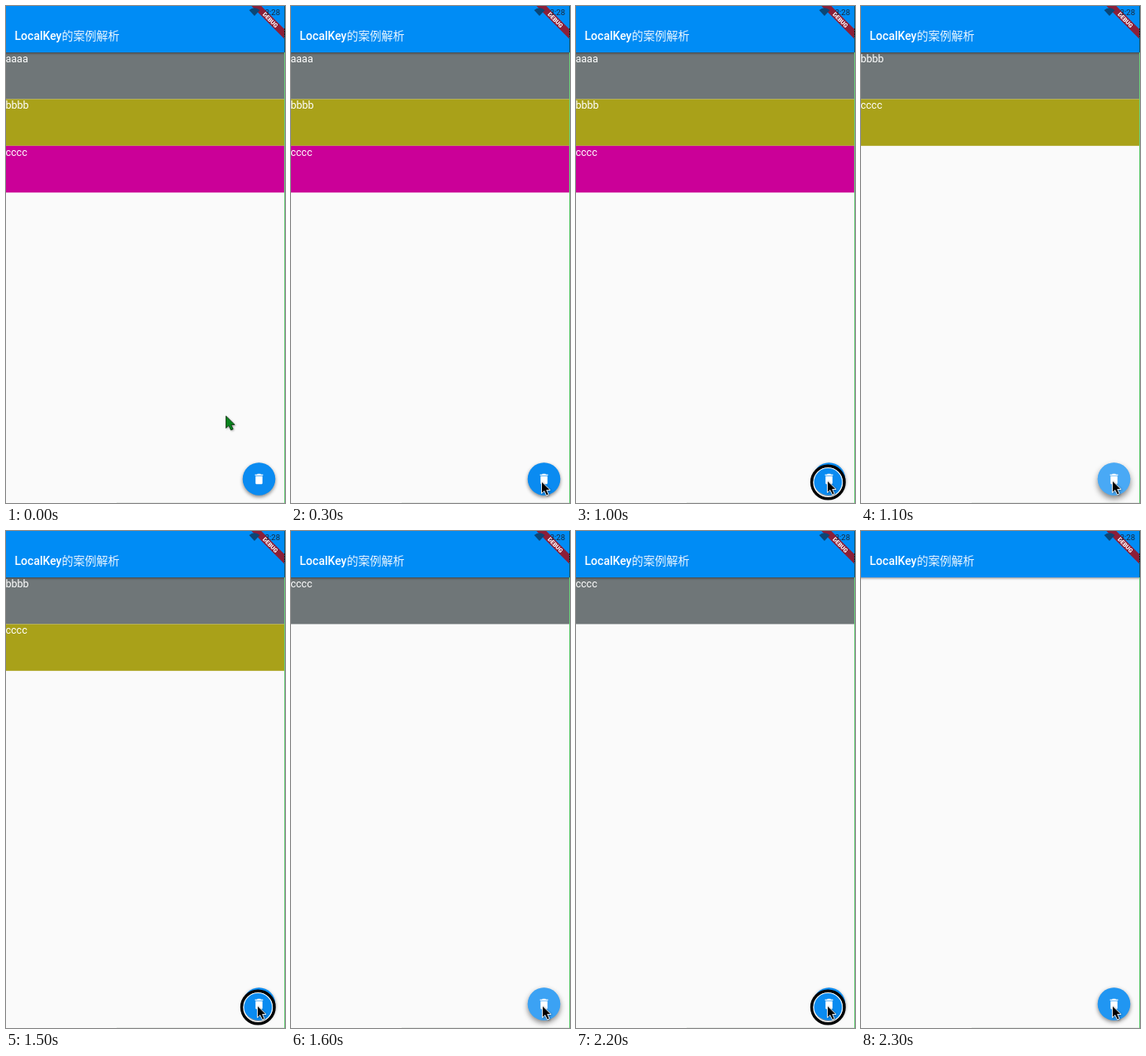
These frames come from a looping animation (338 by 600 pixels, 2400 ms). An HTML page:

```html
<!DOCTYPE html>
<html lang="zh">
<meta charset="utf-8">
<style>
  html, body { margin: 0; width: 100%; height: 100%; overflow: hidden; background: #fafafa; }
  svg { display: block; width: 338px; height: 600px; }
  text { font-family: Roboto, "Noto Sans CJK SC", "Noto Sans CJK", sans-serif; fill: #fff; }
  .row { font-size: 12.6px; }
  #bar { filter: drop-shadow(0 1.5px 1.5px #0007); }
  #pointer { filter: drop-shadow(1px 1px 1px #0005); }
</style>
<svg viewBox="0 0 338 600">
  <rect width="338" height="600" fill="#fafafa"/>
  <g id="rows"></g>
  <rect id="bar" x="-9" y="-9" width="356" height="65" fill="#008cf5"/>
  <text x="10.5" y="41" font-size="14" font-weight="500">LocalKey<tspan font-weight="400" fill-opacity=".92">的案例解析</tspan></text>

  <!-- corner ribbon and status icons -->
  <g transform="translate(337 0) rotate(45)">
    <rect x="-28" y="19.6" width="56" height="8.4" fill="#8c1f38"/>
    <text y="26.3" font-size="7.1" font-weight="900" text-anchor="middle">DEBUG</text>
  </g>
  <path d="M294.5 5Q301 -.5 307.5 5L301 12Z" fill="#0b4677"/>
  <text x="332" y="11" font-size="9.5" text-anchor="end" style="fill:#182838">3:28</text>
  <path d="M337.5 0V56" stroke="#0a5a78"/>
  <path d="M337.5 27V37" stroke="#111" stroke-dasharray="2 1"/>
  <path d="M337.5 56V600" stroke="#69d079"/>
  <path d="M134 599.5H337" stroke="#e9ece9"/>

  <g id="fab">
    <circle cx="306.5" cy="571" r="19.8" fill="#0a8bf1"/>
    <circle id="splash" cx="306.5" cy="571" r="19.8" fill="#fff"/>
  </g>
  <path transform="translate(298.1 562.6) scale(.7)" fill="#fff"
    d="M6 19c0 1.1.9 2 2 2h8c1.1 0 2-.9 2-2V7H6zM19 4h-3.5l-1-1h-5l-1 1H5v2h14z"/>
  <g id="ring" fill="none">
    <circle cx="305.3" cy="575" r="17.6" stroke="#fff" stroke-width="1.4"/>
    <circle cx="305.3" cy="575" r="19.8" stroke="#000" stroke-width="3.4"/>
  </g>
  <path id="pointer" d="M0 0V14.5L3.4 11.5L6 17L8.6 15.8L6.2 10.5H10.6Z" stroke-width=".9"/>
</svg>
<script>
  const LOOP = 2400, STEP = 100;
  const colors = ['#6f7678', '#a9a119', '#cb0098'];
  const labels = ['aaaa', 'bbbb', 'cccc'];
  // time of each press and strength of the highlight that follows it
  const presses = [[1000, .26], [1500, .2], [2200, .09]];
  const $ = id => document.getElementById(id);
  const mix = (a, b, k) => a + (b - a) * k;
  let shown = -1;

  function drawRows(removed) {
    if (removed === shown) return;
    shown = removed;
    $('rows').innerHTML = labels.slice(removed).map((label, i) => {
      const y = 56 + i * 56.4;
      return `<rect y="${y}" width="337" height="56.4" fill="${colors[i]}"/>
        <text class="row" x="-.6" y="${y + 12}">${label}</text>`;
    }).join('');
  }

  function draw(t) {
    const done = presses.filter(([at]) => t > at);
    drawRows(done.length);

    const last = done[done.length - 1];
    const glow = last ? last[1] * Math.max(0, 1 - (t - last[0] - STEP) / 400) : 0;
    $('splash').setAttribute('opacity', glow);
    $('fab').style.filter = `drop-shadow(0 ${2 + glow * 8}px ${2 + glow * 6}px #0007)`;
    $('ring').setAttribute('visibility', presses.some(([at]) => at === t) ? 'visible' : 'hidden');

    const k = Math.min(1, t / 300), ease = k * k * (3 - 2 * k);
    const nudge = t > 300 ? 1 : 0;
    const x = mix(266.5, 303.5, ease) + nudge, y = mix(495, 574, ease) - nudge;
    const pointer = $('pointer');
    pointer.setAttribute('transform', `translate(${x} ${y})`);
    pointer.setAttribute('fill', t < STEP ? '#08831c' : '#000');
    pointer.setAttribute('stroke', t < STEP ? '#123d18' : '#fff');
  }

  const start = performance.now();
  function tick() {
    const t = (performance.now() - start) % LOOP;
    draw(Math.floor(t / STEP) * STEP);
    requestAnimationFrame(tick);
  }
  tick();
</script>
</html>
```
